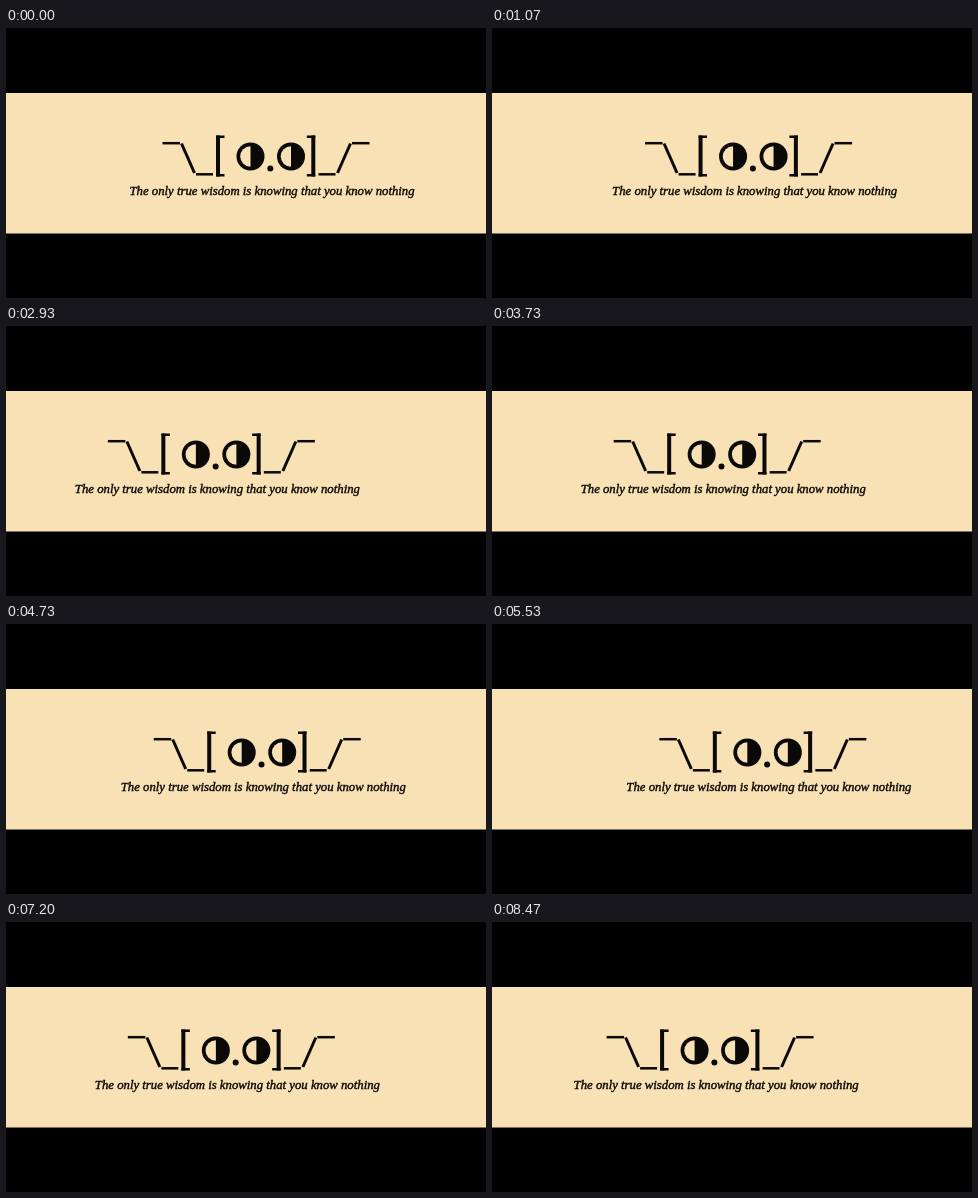
Animation, 480 px wide and 270 px high, one loop 8540 ms. Source, as an HTML page with a canvas:

```html
<!DOCTYPE html>
<html lang="en">
<head>
<meta charset="utf-8">
<title>Wisdom</title>
<style>
  html, body { margin: 0; width: 100%; height: 100%; overflow: hidden; background: #000; }
  canvas { display: block; width: 480px; height: 270px; }
</style>
</head>
<body>
<canvas id="stage" width="480" height="270"></canvas>
<script>
const ctx = document.getElementById('stage').getContext('2d');
const LOOP = 8540, FRAMES = 128, STEP = LOOP / FRAMES;
const INK = '#0b0907', PAPER = '#f8e1b5';

// The banner bounces between two ends: [time, left edge of the caption]
const path = [
  [0, 124], [470, 136.5], [870, 125.5], [1730, 104], [2130, 92], [2600, 77.5],
  [2950, 69], [3470, 82.5], [3730, 89], [4330, 105.5], [4730, 115], [5200, 129],
  [5480, 136.5], [6070, 119.5], [6270, 113], [6930, 96.5], [7200, 89.5],
  [7800, 73.5], [7960, 69], [8470, 82], [LOOP, 84]
];

function leftAt(t) {
  const i = Math.max(1, path.findIndex(p => p[0] >= t));
  const [t0, x0] = path[i - 1], [t1, x1] = path[i];
  return x0 + (x1 - x0) * (t - t0) / (t1 - t0);
}

function line(x0, y0, x1, y1, width) {
  ctx.lineWidth = width;
  ctx.beginPath();
  ctx.moveTo(x0, y0);
  ctx.lineTo(x1, y1);
  ctx.stroke();
}

function disc(x, y, r) {
  ctx.beginPath();
  ctx.arc(x, y, r, 0, Math.PI * 2);
  ctx.fill();
}

// Half-filled circle: paper on the left, ink on the right
function eye(x, y) {
  disc(x, y, 14);
  ctx.fillStyle = PAPER;
  ctx.beginPath();
  ctx.arc(x, y, 10.3, Math.PI / 2, Math.PI * 1.5);
  ctx.fill();
  ctx.fillStyle = INK;
}

function bracket(x, dir) {
  ctx.fillRect(dir > 0 ? x : x - 4, 107.5, 4, 41);
  for (const y of [107.5, 146]) ctx.fillRect(dir > 0 ? x : x - 8.5, y, 8.5, 2.5);
}

function face() {
  line(156.5, 115.2, 174, 115.2, 2.5);
  line(175.5, 115.5, 188.5, 145, 3);
  line(190, 146.3, 207, 146.3, 2.5);
  bracket(210, 1);
  eye(244.5, 128.5);
  disc(264.3, 140.5, 3);
  eye(285, 128.5);
  bracket(309.3, -1);
  line(312.5, 146.3, 329.5, 146.3, 2.5);
  line(331.5, 145, 344.5, 115.5, 3);
  line(346, 115.2, 363.5, 115.2, 2.5);
}

function caption() {
  const text = 'The only true wisdom is knowing that you know nothing';
  ctx.font = 'italic 12.75px "Liberation Serif", "Times New Roman", serif';
  ctx.lineWidth = 0.4;
  ctx.fillText(text, 123.5, 166.5);
  ctx.strokeText(text, 123.5, 166.5);
}

function draw(t) {
  ctx.fillStyle = '#000';
  ctx.fillRect(0, 0, 480, 270);
  ctx.fillStyle = PAPER;
  ctx.fillRect(0, 65, 480, 140.5);
  ctx.save();
  ctx.translate(leftAt(t) - 124, 0);
  ctx.fillStyle = ctx.strokeStyle = INK;
  face();
  caption();
  ctx.restore();
}

const start = performance.now();
function tick(now) {
  const t = Math.max(0, now - start) % LOOP;
  const n = Math.min(FRAMES - 1, Math.floor((t + 12) / STEP));
  draw(n * STEP);
  requestAnimationFrame(tick);
}
draw(0);
requestAnimationFrame(tick);
</script>
</body>
</html>
```
